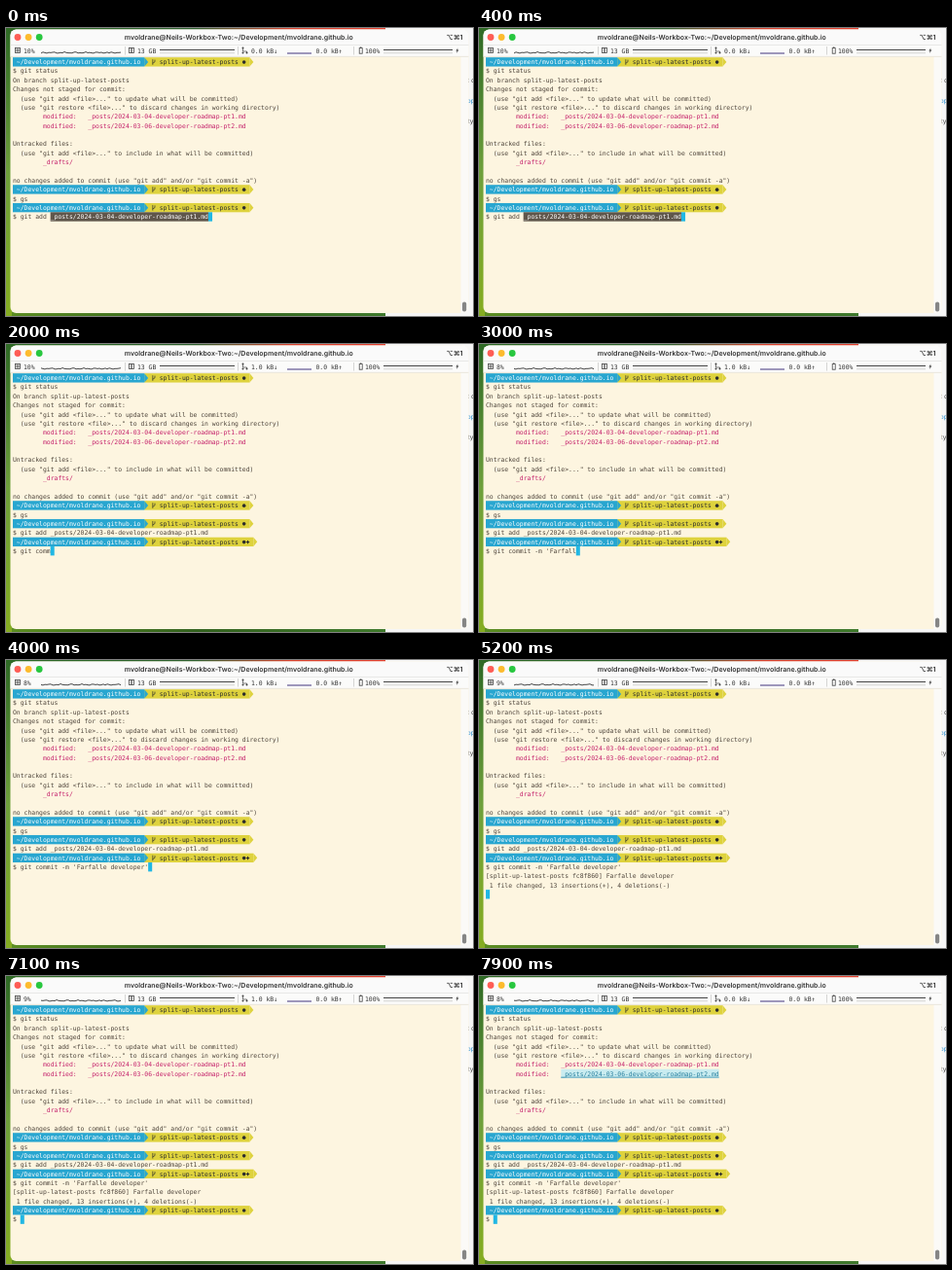
An HTML page with a canvas for the animation above (8000 ms loop, 480 by 296 pixels).

```html
<!DOCTYPE html>
<html lang="en">
<meta charset="utf-8">
<title>Terminal</title>
<style>
html, body { margin: 0; width: 100%; height: 100%; overflow: hidden; background: #fff }
canvas { display: block }
</style>
<canvas width="480" height="296"></canvas>
<script>
const ctx = document.querySelector('canvas').getContext('2d');
const LOOP = 8000, COL = 3.865, ROW = 9.36, LEFT = 7, TOP = 30.2;
const INK = '#4d443a', PAPER = '#fdf5e0', PINK = '#c41f6a', BLUE = '#28a6d0',
      YELLOW = '#ded23d', CURSOR = '#20b7e4', DARK = '#2c2c2c', MARK = '#5f564b';
const MONO = '6.41px "DejaVu Sans Mono", monospace';
const USER = 'mvoldrane', DIR = `~/Development/${USER}.github.io`;
const TITLE = `${USER}@Neils-Workbox-Two:${DIR}`;
const POST = '_posts/2024-03-04-developer-roadmap-pt1.md';
const POST2 = '_posts/2024-03-06-developer-roadmap-pt2.md';
const COMMIT = "git commit -m 'Farfalle developer'";
const X = col => LEFT + col * COL, Y = row => TOP + row * ROW;

function rect(x, y, w, h, color) {
  ctx.fillStyle = color;
  ctx.fillRect(x, y, w, h);
}
function line(points, color, width = 0.7) {
  ctx.beginPath();
  points.forEach(([x, y]) => ctx.lineTo(x, y));
  ctx.strokeStyle = color;
  ctx.lineWidth = width;
  ctx.stroke();
}
function poly(points, color) {
  ctx.beginPath();
  points.forEach(([x, y]) => ctx.lineTo(x, y));
  ctx.fillStyle = color;
  ctx.fill();
}
function dot(x, y, r, color) {
  ctx.beginPath();
  ctx.arc(x, y, r, 0, 7);
  ctx.fillStyle = color;
  ctx.fill();
}
function label(text, x, y, font, color, align = 'left') {
  ctx.font = font;
  ctx.textAlign = align;
  ctx.fillStyle = color;
  ctx.fillText(text, x, y);
}
// Monospaced text, one character per cell
function mono(text, x, y, color) {
  [...text].forEach((c, i) => {
    if (c !== ' ') label(c, x + i * COL, y, MONO, color);
  });
}
const put = (row, col, text, color = INK) => mono(text, X(col), Y(row) + 6.9, color);
const cells = (row, col, n, color) => rect(X(col), Y(row), n * COL, ROW, color);
const cursor = (row, col) => cells(row, col, 1.05, CURSOR);
const arrow = (row, col, color) =>
  poly([[X(col), Y(row)], [X(col + 1), Y(row) + ROW / 2], [X(col), Y(row) + ROW]], color);

function prompt(row, staged) {
  const end = staged ? 64 : 63, x = X(37), y = Y(row);
  cells(row, 0, 35, BLUE);
  cells(row, 35, end - 35, YELLOW);
  arrow(row, 35, BLUE);
  arrow(row, end, YELLOW);
  put(row, 1, DIR, '#fff');
  line([[x + 0.8, y + 2], [x + 0.8, y + 7.6]], DARK);
  line([[x + 0.8, y + 6], [x + 3, y + 4.6], [x + 3, y + 2.4]], DARK);
  put(row, 39, 'split-up-latest-posts', DARK);
  dot(X(61) + 1.9, y + 4.9, 1.8, DARK);
  if (staged) {
    const px = X(62) + 1.9, py = y + 4.9;
    line([[px - 1.7, py], [px + 1.7, py]], DARK, 1.1);
    line([[px, py - 1.7], [px, py + 1.7]], DARK, 1.1);
  }
}

function gradient(x, y, ...colors) {
  const g = ctx.createLinearGradient(0, 0, x, y);
  colors.forEach((c, i) => g.addColorStop(i / (colors.length - 1), c));
  return g;
}

function desktop() {
  rect(0, 0, 390, 4, gradient(390, 0, '#2f6a26', '#2c6428', '#2f6030', '#d8432f', '#e2402f'));
  rect(0, 4, 390, 292, gradient(390, 0, '#5d8f22', '#33621f', '#3f7a2c'));
  rect(0, 0, 6, 296, gradient(0, 296, '#2f6a26', '#6fa03c', '#86ad22'));
  rect(390, 0, 90, 296, '#f6f6f6');
  const font = '6.5px Inter, sans-serif';
  label('t c', 474, 55.5, font, '#444');
  label('app', 470, 77, font, '#2b8fd0');
  label('ity', 473, 97.5, font, '#444');
}

function statusBar(t) {
  const gray = '#444', pale = '#c4c4c2';
  const cpu = t < 2600 ? 10 : t < 4600 ? 8 : t < 7500 ? 9 : 8;
  const down = t >= 600 && t < 7500 ? '1.0' : '0.0';
  rect(4, 17, 472, 12.5, '#fbfbfa');
  rect(4, 17, 472, 0.6, '#dcdcda');
  rect(4, 28.9, 472, 0.6, '#dddacf');
  const text = (s, x) => mono(s, x, 25.6, '#333');
  const level = (x, w) => {
    rect(x, 22, w, 1, gray);
    rect(x, 25.5, w, 0.7, pale);
  };
  [122, 238, 357].forEach(x => rect(x, 19, 0.7, 8.5, pale));

  ctx.lineWidth = 0.8;
  ctx.strokeStyle = gray;
  ctx.strokeRect(9.5, 20.5, 5, 5);
  ctx.strokeRect(11, 22, 2, 2);
  text(cpu + '%', 18);
  const shift = Math.floor((t + 1400) / 2000);
  line(Array.from({ length: 42 }, (_, i) => {
    const n = i + shift;
    return [36 + i * 2, 25.9 - 0.7 * Math.abs(Math.sin(n * 1.7) + Math.sin(n * 0.63))];
  }), '#333', 0.9);

  ctx.lineWidth = 0.8;
  ctx.strokeStyle = gray;
  ctx.strokeRect(126.5, 20.5, 5, 5);
  line([[129, 20.5], [129, 25.5]], gray, 1.2);
  text('13 GB', 135);
  level(158, 77);

  line([[243.5, 20], [243.5, 24], [247.5, 24], [247.5, 26]], gray);
  dot(243.5, 20.6, 1, gray);
  dot(243.5, 25.4, 1, gray);
  dot(247.5, 25.6, 1, gray);
  text(down + ' kB↓', 252);
  rect(289, 25.5, 25, 1, '#43347e');
  text('0.0 kB↑', 318.5);

  ctx.lineWidth = 0.8;
  ctx.strokeRect(363.2, 20.6, 3, 5.6);
  rect(364, 19.5, 1.4, 1, gray);
  text('100%', 369);
  level(388, 71);
  poly([[464.4, 20.4], [462.4, 23.4], [463.6, 23.4], [463, 26], [465.4, 22.6], [464, 22.6]], gray);
}

function windowFrame(t) {
  ctx.save();
  ctx.beginPath();
  ctx.roundRect(4.5, 1.5, 471, 291.5, 6);
  ctx.fillStyle = PAPER;
  ctx.fill();
  ctx.clip();
  rect(4, 1, 472, 16, '#fafafa');
  rect(467.5, 29.5, 8, 264, '#fbfaf7');
  ['#fe5d55', '#fdbb2d', '#28c73f'].forEach((c, i) => dot(12 + i * 11.1, 9.5, 3.4, c));
  label(TITLE, 239.3, 11.8, '600 7px Inter, sans-serif', '#333', 'center');
  label('⌥⌘1', 469.5, 11.7, '600 7px Inter, "DejaVu Sans", sans-serif', '#333', 'right');
  statusBar(t);
  ctx.beginPath();
  ctx.roundRect(469, 281.5, 4.2, 10, 2.1);
  ctx.fillStyle = '#858585';
  ctx.fill();
  ctx.restore();
}

function history(t) {
  prompt(0);
  put(1, 0, '$ git status');
  put(2, 0, 'On branch split-up-latest-posts');
  put(3, 0, 'Changes not staged for commit:');
  put(4, 2, '(use "git add <file>..." to update what will be committed)');
  put(5, 2, '(use "git restore <file>..." to discard changes in working directory)');
  put(6, 8, 'modified:   ' + POST, PINK);
  put(7, 8, 'modified:', PINK);
  const hover = t >= 7600;
  if (hover) {
    cells(7, 20, 42, '#c9ecf0');
    rect(X(20), Y(7) + 8, 42 * COL, 0.7, '#287f9d');
  }
  put(7, 20, POST2, hover ? '#287f9d' : PINK);
  put(9, 0, 'Untracked files:');
  put(10, 2, '(use "git add <file>..." to include in what will be committed)');
  put(11, 8, '_drafts/', PINK);
  put(13, 0, 'no changes added to commit (use "git add" and/or "git commit -a")');
  prompt(14);
  put(15, 0, '$ gs');
  prompt(16);
}

// Number of characters of the commit command typed so far
function typed(t) {
  if (t < 800) return 0;
  if (t < 2000) return 2 + Math.floor((t - 1000) * 6 / 1000);
  return Math.min(COMMIT.length, 8 + Math.floor((t - 2000) / 70));
}

function session(t) {
  put(17, 0, '$ git add ');
  if (t < 500) {
    cells(17, 10, POST.length, MARK);
    put(17, 10, POST, '#fff');
    return cursor(17, 10 + POST.length);
  }
  put(17, 10, POST);
  if (t < 700) return cursor(18, 0);
  prompt(18, true);
  const n = typed(t);
  put(19, 0, '$ ' + COMMIT.slice(0, n));
  if (t < 4800) return cursor(19, 2 + n);
  if (t < 5000) return cursor(20, 0);
  put(20, 0, '[split-up-latest-posts fc8f860] Farfalle developer');
  put(21, 1, '1 file changed, 13 insertions(+), 4 deletions(-)');
  if (t < 5500) return cursor(22, 0);
  prompt(22);
  put(23, 0, '$');
  cursor(23, 2);
}

function draw(now) {
  const t = Math.floor(now % LOOP / 100) * 100;
  ctx.textRendering = 'geometricPrecision';
  desktop();
  windowFrame(t);
  history(t);
  session(t);
  requestAnimationFrame(draw);
}
requestAnimationFrame(draw);
</script>
</html>
```
